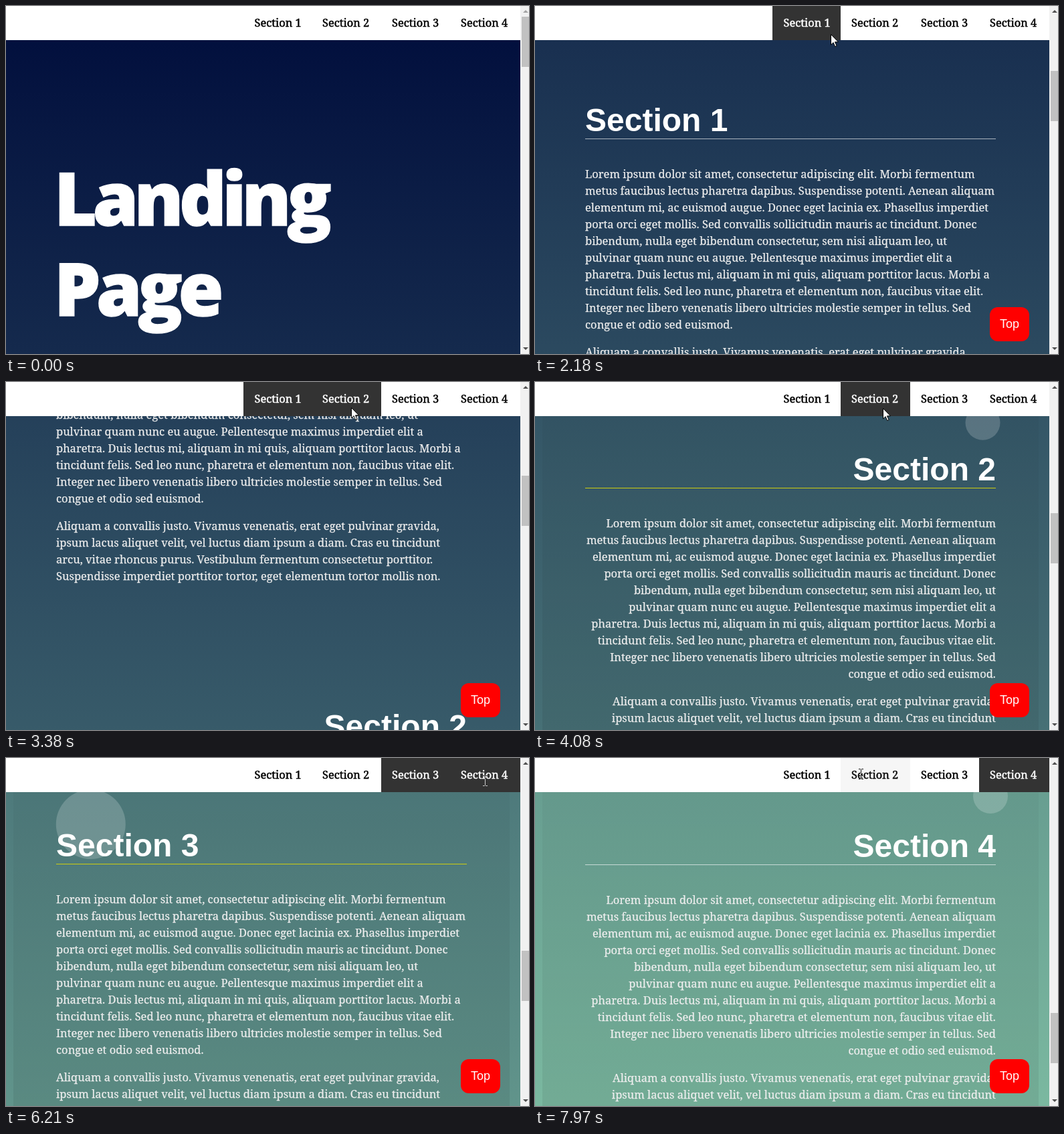
An HTML page for the animation above (8000 ms loop, 782 px wide and 520 px high).

```html
<!DOCTYPE html>
<html lang="en">
<head>
<meta charset="utf-8">
<title>Landing Page</title>
<style>
html, body { margin: 0; width: 100%; height: 100%; overflow: hidden; background: #fff; }
svg { display: block; width: 782px; height: 520px; }
text { white-space: pre; }
.h1 { font: 800 110px "Open Sans", sans-serif; letter-spacing: -.058em; fill: #fff; stroke: #fff; stroke-width: 1.5; }
.h2 { font: 700 48px "Liberation Sans", Arial, sans-serif; fill: #fff; }
.p { font: 400 16.5px "Noto Serif", serif; fill: #eee; stroke: #eee; stroke-width: .25; }
.link { font: 500 16.4px "Noto Serif", serif; stroke-width: .5; }
.top { font: 400 18px "Liberation Sans", Arial, sans-serif; fill: #fff; text-anchor: middle; }
.beam { mix-blend-mode: difference; }
</style>
</head>
<body>
<svg id="stage" viewBox="0 0 782 520">
  <defs>
    <linearGradient id="sky" x2="0" y2="1">
      <stop stop-color="#000d3c"/><stop offset="1" stop-color="#88cbab"/>
    </linearGradient>
    <linearGradient id="shade" x2="0" y2="1">
      <stop stop-opacity=".03"/><stop offset="1" stop-opacity=".08"/>
    </linearGradient>
  </defs>
</svg>
<script>
const LOOP = 8000, PAGE = 3396, RATIO = 6.96, SCROLL_MS = 380, LEAVE_MS = 100;
const SECTION_TOP = 603, PITCH = 646;

const paragraphs = [[
  "Lorem ipsum dolor sit amet, consectetur adipiscing elit. Morbi fermentum",
  "metus faucibus lectus pharetra dapibus. Suspendisse potenti. Aenean aliquam",
  "elementum mi, ac euismod augue. Donec eget lacinia ex. Phasellus imperdiet",
  "porta orci eget mollis. Sed convallis sollicitudin mauris ac tincidunt. Donec",
  "bibendum, nulla eget bibendum consectetur, sem nisi aliquam leo, ut",
  "pulvinar quam nunc eu augue. Pellentesque maximus imperdiet elit a",
  "pharetra. Duis lectus mi, aliquam in mi quis, aliquam porttitor lacus. Morbi a",
  "tincidunt felis. Sed leo nunc, pharetra et elementum non, faucibus vitae elit.",
  "Integer nec libero venenatis libero ultricies molestie semper in tellus. Sed",
  "congue et odio sed euismod."
], [
  "Aliquam a convallis justo. Vivamus venenatis, erat eget pulvinar gravida,",
  "ipsum lacus aliquet velit, vel luctus diam ipsum a diam. Cras eu tincidunt",
  "arcu, vitae rhoncus purus. Vestibulum fermentum consectetur porttitor.",
  "Suspendisse imperdiet porttitor tortor, eget elementum tortor mollis non."
]];

// scroll: start of the smooth scroll; active: when the section lights up
const sections = [
  { scroll: 1860, active: 2200, nudge: 0 },
  { scroll: 3215, active: 3590, nudge: 1 },
  { scroll: 4901, active: 5220, nudge: 1 },
  { scroll: 6620, active: 6970, nudge: 0 }
];
const edges = [355, 457, 561, 664, 769];
const labelX = [371.5, 473, 577, 680];

// pointer path: time, x, y
const path = [
  [840, 614, 416], [1150, 375, 150], [1330, 418, 78], [1490, 428, 47], [1570, 430, 42],
  [1800, 436, 43], [2530, 448, 41], [2950, 452, 42], [3150, 515, 38], [4080, 520, 39],
  [4450, 522, 38], [4750, 598, 31], [5100, 601, 30], [5760, 606, 32], [5950, 712, 34],
  [6210, 716, 34], [7300, 714, 33], [7430, 700, 30], [7650, 560, 25], [7800, 440, 24],
  [7940, 440, 24], [7970, 487, 24], [8000, 489, 24]
];

const stage = document.getElementById("stage");
const clamp = v => Math.max(0, Math.min(1, v));
const smooth = v => v * v * (3 - 2 * v);
const show = (el, on) => el.setAttribute("visibility", on ? "visible" : "hidden");

function add(parent, tag, attrs, content) {
  const el = document.createElementNS("http://www.w3.org/2000/svg", tag);
  for (const k in attrs) el.setAttribute(k, attrs[k]);
  if (content) el.textContent = content;
  parent.append(el);
  return el;
}
const rect = (parent, x, y, width, height, fill, more) =>
  add(parent, "rect", { x, y, width, height, fill, ...more });

const page = add(stage, "g", {});
rect(page, 0, 0, 769, PAGE, "url(#sky)");
add(page, "text", { class: "h1", x: 72, y: 328 }, "Landing");
add(page, "text", { class: "h1", x: 72, y: 463 }, "Page");

sections.forEach((s, i) => {
  const right = i % 2 === 1;
  const g = add(page, "g", { transform: `translate(0 ${SECTION_TOP + PITCH * i})` });
  const align = { x: right ? 689 : 75, "text-anchor": right ? "end" : "start" };
  s.leave = i < 3 ? sections[i + 1].scroll + LEAVE_MS : LOOP;
  s.panel = rect(g, 11, 0, 742, PITCH, "url(#shade)");
  s.disc = add(g, "circle", { r: right ? 26 : 52, fill: "#fff" });
  s.orbit = right ? [681, 73] : [127, 116];
  add(g, "text", { class: "h2", y: 148, ...align }, "Section " + (i + 1));
  rect(g, 75, 159, 614, 1, s.nudge ? "#cc1" : "rgba(255,255,255,.62)");
  paragraphs.forEach((lines, n) => lines.forEach((line, k) =>
    add(g, "text", { class: "p", y: 218 + n * 266 + k * 25, ...align }, line)));
});

const topButton = add(stage, "g", {});
rect(topButton, 680, 450, 59, 51, "#f00", { rx: 12 });
add(topButton, "text", { class: "top", x: 709.5, y: 481 }, "Top");

rect(stage, 0, 0, 769, 51, "#fff");
const links = labelX.map((x, i) => ({
  box: rect(stage, edges[i], 0, edges[i + 1] - edges[i], 51),
  label: add(stage, "text", { class: "link", x, y: 31 }, "Section " + (i + 1))
}));

rect(stage, 769, 0, 13, 520, "#f1f1f1");
const thumb = rect(stage, 771, 16, 11, 75, "#c1c1c1");
const upArrow = add(stage, "path", { d: "M773 10h8l-4-4z" });
add(stage, "path", { d: "M773 510h8l-4 4z", fill: "#505050" });

const arrow = add(stage, "path", {
  d: "M.5 .5v15.5l3.6-3.4 2.6 6 2.4-1-2.6-5.8h5z", fill: "#fff", stroke: "#000"
});
const beam = add(stage, "path", {
  class: "beam", d: "M-3.5-7.5h2.5l1 1 1-1h2.5M0-6.5v13M-3.5 7.5h2.5l1-1 1 1h2.5",
  fill: "none", stroke: "#fff"
});

function pointer(t) {
  const n = path.findIndex(p => p[0] > t);
  if (n < 1) return null;
  const [a, b] = [path[n - 1], path[n]];
  const f = (t - a[0]) / (b[0] - a[0]);
  return [a[1] + (b[1] - a[1]) * f, a[2] + (b[2] - a[2]) * f];
}

function linkAt(t) {
  const p = pointer(t);
  return p && p[1] < 46 ? edges.findIndex((x, i) => p[0] >= x && p[0] < edges[i + 1]) : -1;
}

// hover spans: link, enter time
const hovers = [];
for (let t = 0, last = -1; t < LOOP; t += 2) {
  const i = linkAt(t);
  if (i !== last) hovers.push([i, t]);
  last = i;
}

function scrollAt(t) {
  let y = 0;
  sections.forEach((s, i) => {
    const goal = SECTION_TOP + PITCH * i + s.nudge;
    y += (goal - y) * smooth(clamp((t - s.scroll) / SCROLL_MS));
  });
  return y;
}

function drawSection(s, t) {
  const on = t >= s.active && t < s.leave;
  const a = (t - s.active) / 4000 * 2 * Math.PI;
  show(s.panel, on);
  show(s.disc, on);
  s.disc.setAttribute("cx", s.orbit[0] - 16 * Math.cos(a));
  s.disc.setAttribute("cy", s.orbit[1] - 16 * Math.sin(a));
  s.disc.setAttribute("fill-opacity", .187 * clamp((t - s.active) / 200));
}

function drawLink(link, i, active, hover, t) {
  let k = i === active ? 1 : 0;
  if (hover && hover[0] === i) k = Math.max(k, smooth(clamp((t - hover[1] + 20) / 300)));
  const bg = Math.round(255 - 204 * k), ink = Math.round(255 * k);
  link.box.setAttribute("fill", `rgb(${bg},${bg},${bg})`);
  for (const paint of ["fill", "stroke"])
    link.label.setAttribute(paint, `rgb(${ink},${ink},${ink})`);
}

function drawPointer(t) {
  const p = pointer(t);
  const overText = p && p[1] > 12 && p[1] < 37 &&
    labelX.some(x => p[0] >= x && p[0] < x + 73);
  show(arrow, p && !overText);
  show(beam, overText);
  if (!p) return;
  const [x, y] = p.map(Math.round);
  arrow.setAttribute("transform", `translate(${x} ${y})`);
  beam.setAttribute("transform", `translate(${x + .5} ${y})`);
}

function render(t) {
  const y = scrollAt(t);
  const active = sections.filter(s => t >= s.active).length - 1;
  const hover = hovers.filter(h => h[1] <= t).pop();
  page.setAttribute("transform", `translate(0 ${-Math.round(y)})`);
  thumb.setAttribute("y", Math.round(16 + y / RATIO));
  upArrow.setAttribute("fill", y > 0 ? "#505050" : "#a3a3a3");
  show(topButton, y > 100);
  sections.forEach(s => drawSection(s, t));
  links.forEach((link, i) => drawLink(link, i, active, hover, t));
  drawPointer(t);
}

const start = performance.now();
function tick() {
  render((performance.now() - start) % LOOP);
  requestAnimationFrame(tick);
}
tick();
</script>
</body>
</html>
```
